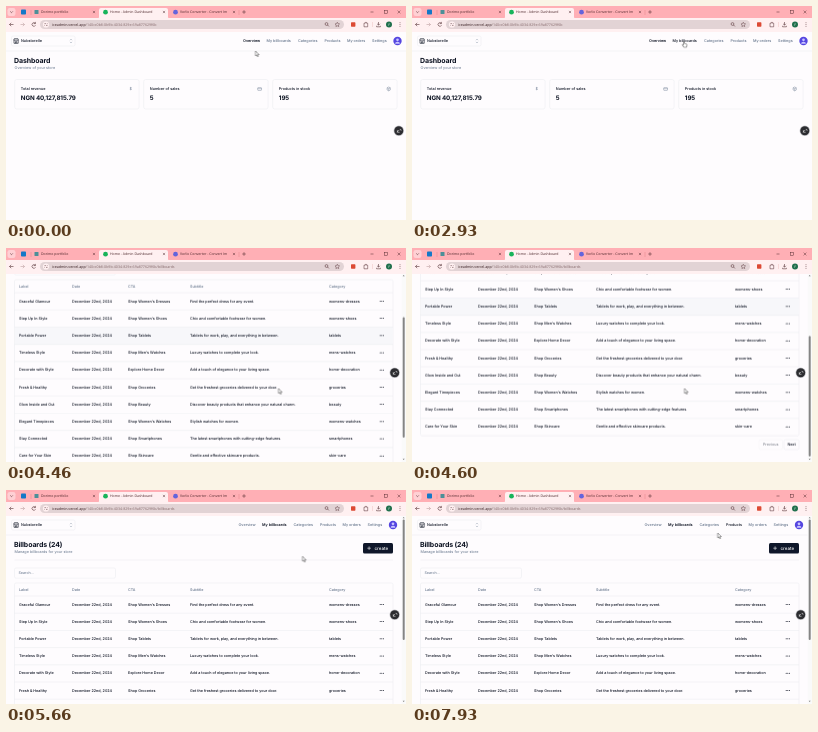
Write an HTML page that moves like this. It is 400x214 px and loops after 8 s.

```html
<!DOCTYPE html>
<html lang="en">
<head>
<meta charset="utf-8">
<title>Admin Dashboard</title>
<style>
  html, body { margin: 0; width: 100%; height: 100%; overflow: hidden; background: #fefcfe; }
  svg { display: block; width: 100vw; height: 100vh; }
  text { font-family: Inter, Roboto, sans-serif; text-rendering: geometricPrecision; white-space: pre; }
  .chrome text { font-family: "Open Sans", "Noto Sans", sans-serif; }
</style>
</head>
<body>
<svg id="stage" viewBox="0 0 400 214" preserveAspectRatio="none">
  <defs><clipPath id="view"><rect y="25" width="400" height="189"/></clipPath></defs>
</svg>
<script>
const LOOP = 8000, INK = '#0b1120', GREY = '#64748b', LINE = '#e9eaee', PAPER = '#fefcfe';
const PAGE_LOAD = 3260, SCROLL = 90.4, ROW = 17.2, TABLE_TOP = 106;
const stage = document.getElementById('stage');

function add(parent, tag, attrs = {}, content) {
  const el = document.createElementNS('http://www.w3.org/2000/svg', tag);
  for (const key in attrs) el.setAttribute(key, attrs[key]);
  if (content !== undefined) el.textContent = content;
  parent.append(el);
  return el;
}
const group = (parent, attrs) => add(parent, 'g', attrs);
const rect = (parent, x, y, width, height, fill, more) =>
  add(parent, 'rect', { x, y, width, height, fill, ...more });
const disc = (parent, cx, cy, r, fill, more) => add(parent, 'circle', { cx, cy, r, fill, ...more });
const path = (parent, d, stroke = INK, width = .55, fill = 'none') =>
  add(parent, 'path', { d, stroke, 'stroke-width': width, fill });
// y is the middle of the lower-case line
const label = (parent, x, y, content, size = 3.7, fill = INK, weight = 500, more = {}) =>
  add(parent, 'text', { x, y: y + size * .35, 'font-size': size, fill, 'font-weight': weight, ...more }, content);
const box = (parent, x, y, w, h, rx = 1.5) =>
  rect(parent, x, y, w, h, PAPER, { rx, stroke: LINE, 'stroke-width': .5 });

// steps: [time, value, easing towards the next step]
function play(el, prop, steps, easing = 'linear') {
  const frames = steps.map(([time, value, ease = easing]) =>
    ({ offset: time / LOOP, [prop]: value, easing: ease }));
  if (frames[0].offset > 0) frames.unshift({ ...frames[0], offset: 0 });
  const last = frames[frames.length - 1];
  if (last.offset < 1) frames.push({ ...last, offset: 1 });
  el.animate(frames, { duration: LOOP, iterations: Infinity });
}
// spans: [from, to] in ms during which the element shows
function showDuring(el, ...spans) {
  const steps = spans[0][0] > 0 ? [[0, 0]] : [];
  for (const [from, to] of spans) {
    steps.push([from, 1]);
    if (to < LOOP) steps.push([to, 0]);
  }
  play(el, 'opacity', steps, 'step-end');
}

function drawUrl(g, page, span) {
  const url = label(g, 46, 18.5, 'iceadmin.vercel.app', 3.62, '#33191c', 400);
  add(url, 'tspan', { fill: '#85696b' }, '/140cc0b8-0b9b-4034-829e-69a877629f6b' + page);
  showDuring(url, span);
}

function drawBrowser() {
  const g = group(stage, { class: 'chrome' });
  const dark = '#4a2529', bar = '#fff0f1';
  const close = (x, y, r = 1.1) =>
    path(g, `M${x - r} ${y - r}l${2 * r} ${2 * r}m0 ${-2 * r}l${-2 * r} ${2 * r}`, dark, .45);
  rect(g, 0, 0, 400, 13, '#ffafb5');
  rect(g, 1.5, 2, 8, 8, '#ffd0d4', { rx: 2.2 });
  path(g, 'M4.2 5.4l1.3 1.3 1.3-1.3', dark);
  rect(g, 15, 3.5, 5, 5, '#1478c8', { rx: .8 });
  path(g, 'M25 4v5M233 4v5', '#d97d82', .4);
  rect(g, 28.5, 4, 4, 4, '#4c8f98', { rx: .5 });
  label(g, 35, 6, 'Dorimo portfolio', 3.5, dark, 400);
  close(88, 6);
  path(g, 'M91 13q2 0 2-2V4q0-2 2-2h65q2 0 2 2v7q0 2 2 2z', 'none', 0, bar);
  disc(g, 99.5, 6.2, 2.4, '#18b45b');
  label(g, 104, 6, 'Home - Admin Dashboard', 3.5, dark, 400);
  close(158, 6);
  disc(g, 169.5, 6.2, 2.4, '#6464dc');
  label(g, 174, 6, 'Vorlix Converter - Convert Im', 3.5, dark, 400);
  close(228, 6);
  path(g, 'M236.2 6h3.6m-1.8-1.8v3.6M364.5 6h3', dark, .5);
  rect(g, 378.6, 4.6, 2.8, 2.8, 'none', { stroke: dark, 'stroke-width': .45 });
  close(393, 6, 1.4);

  rect(g, 0, 12, 400, 14, bar);
  path(g, 'M7.5 18.5h-4m1.7-1.7l-1.7 1.7 1.7 1.7', dark);
  path(g, 'M14.5 18.5h4m-1.7-1.7l1.7 1.7-1.7 1.7', '#b99a9c');
  path(g, 'M29.3 17.4a1.8 1.8 0 1 0 .2 1.8m-.1-3.3v1.7h-1.7', dark);
  rect(g, 34, 13.9, 304, 9.2, '#e2d3d5', { rx: 4.6 });
  disc(g, 40, 18.5, 3.1, bar);
  path(g, 'M38.5 17.6h1.4m1 0h.6m-3 1.8h.5m1 0h1.5', dark, .5);
  drawUrl(g, '', [0, PAGE_LOAD]);
  drawUrl(g, '/billboards', [PAGE_LOAD, LOOP]);
  disc(g, 320.5, 18, 1.4, 'none', { stroke: dark, 'stroke-width': .5 });
  path(g, 'M321.5 19l1.4 1.4', dark);
  path(g, 'M331.3 16.2l.7 1.5 1.6.2-1.2 1.1.3 1.6-1.4-.8-1.4.8.3-1.6-1.2-1.1 1.6-.2z', dark, .4);
  rect(g, 345, 16.3, 4.4, 4.4, '#dc4a34', { rx: .6 });
  path(g, 'M358 17.2h1.3v-.8h1.2v.8h1.2v3.6H358z', dark, .5);
  path(g, 'M366.5 16v5', '#e9b5b7', .4);
  path(g, 'M372.5 16v3m-1.4-1.2l1.4 1.4 1.4-1.4m-3.3 2v1h3.8v-1', dark);
  disc(g, 383, 18.5, 3, '#20704d');
  label(g, 383, 18.4, 'F', 3.3, '#fff', 400, { 'text-anchor': 'middle' });
  for (const y of [16.8, 18.5, 20.2]) disc(g, 394, y, .45, dark);
}

const NAV = [['Overview', 237], ['My billboards', 260.5], ['Categories', 292],
  ['Products', 318.5], ['My orders', 341], ['Settings', 366]];

// shift makes room for the scrollbar; hover is [link, start, end]
function drawHeader(g, active, shift, hover) {
  box(g, 5.5, 30, 63.5, 10);
  path(g, 'M8 34.3v3h4.2v-3M7.7 34.2l.6-1.5h3.6l.6 1.5zM9.5 37.3v-1.7h1.2v1.7', INK, .6);
  label(g, 15, 35, 'Nubstorelle', 3.8);
  path(g, 'M64 34.2l1-1 1 1m-2 1.7l1 1 1-1', GREY, .4);
  NAV.forEach(([name, x], i) => {
    const link = label(g, x - shift, 35, name, 3.75, i === active ? INK : GREY, i === active ? 600 : 500);
    if (i === hover[0])
      play(link, 'fill', [[0, GREY], [hover[1], GREY], [hover[1] + 150, INK], [hover[2], INK]]);
  });
  const x = 391.5 - shift;
  disc(g, x, 35, 4.2, '#5546e0');
  disc(g, x, 33.8, 1.35, '#c9c5ff');
  path(g, `M${x - 2.4} 37.8q0-2 2.4-2t2.4 2z`, 'none', 0, '#c9c5ff');
  path(g, `M0 45h${400 - shift}`, LINE, .5);
}

function drawTitle(g, title, subtitle) {
  label(g, 8, 54.7, title, 7, INK, 700, { 'letter-spacing': -.12 });
  label(g, 8.5, 62, subtitle, 3.78, GREY, 400);
}

function drawFloater(g, x) {
  disc(g, x, 124.8, 5.2, '#c6c6ca');
  disc(g, x, 124.8, 4.5, '#2c2c30');
  path(g, `M${x - 1.8} 126.2l2.4-2.4m-2 .3v2.2h2.2m.3-3.1q1.6 0 1.2 1.6`, '#fff', .5);
}

function drawOverview(g) {
  rect(g, 0, 25, 400, 189, PAPER);
  drawHeader(g, 0, 0, [1, 2650, PAGE_LOAD]);
  drawTitle(g, 'Dashboard', 'Overview of your store');
  const cards = [['Total revenue', 'NGN 40,127,815.79'], ['Number of sales', '5'], ['Products in stock', '195']];
  cards.forEach(([name, value], i) => {
    const x = 8.7 + i * 129;
    box(g, x, 73.5, 124.4, 29.5, 2);
    label(g, x + 6.1, 82.8, name, 3.8, INK, 500);
    label(g, x + 6.1, 91.8, value, 6.2, INK, 700, { 'letter-spacing': -.08 });
  });
  label(g, 124.7, 83, '$', 3.8, GREY, 400, { 'text-anchor': 'middle' });
  rect(g, 251.7, 81.6, 3.8, 2.8, 'none', { rx: .5, stroke: GREY, 'stroke-width': .4 });
  path(g, 'M251.7 82.7h3.8', GREY, .4);
  path(g, 'M382.7 81l1.6.8v2.2l-1.6.9-1.6-.9v-2.2zm-1.6.8l1.6.9 1.6-.9m-1.6.9v2.2', GREY, .4);
  drawFloater(g, 392.8);
}

const COLUMNS = [[13, 'Label'], [66, 'Date'], [122, 'CTA'], [184, 'Subtitle'], [323, 'Category']];
const ROWS = [
  ['Graceful Glamour', "Shop Women's Dresses", 'Find the perfect dress for any event.', 'womens-dresses'],
  ['Step Up In Style', "Shop Women's Shoes", 'Chic and comfortable footwear for women.', 'womens-shoes'],
  ['Portable Power', 'Shop Tablets', 'Tablets for work, play, and everything in between.', 'tablets'],
  ['Timeless Style', "Shop Men's Watches", 'Luxury watches to complete your look.', 'mens-watches'],
  ['Decorate with Style', 'Explore Home Decor', 'Add a touch of elegance to your living space.', 'home-decoration'],
  ['Fresh & Healthy', 'Shop Groceries', 'Get the freshest groceries delivered to your door.', 'groceries'],
  ['Glow Inside and Out', 'Shop Beauty', 'Discover beauty products that enhance your natural charm.', 'beauty'],
  ['Elegant Timepieces', "Shop Women's Watches", 'Stylish watches for women.', 'womens-watches'],
  ['Stay Connected', 'Shop Smartphones', 'The latest smartphones with cutting-edge features.', 'smartphones'],
  ['Care for Your Skin', 'Shop Skincare', 'Gentle and effective skincare products.', 'skin-care']
];
const ROW_HOVERS = {
  0: [[3990, 4050]],
  1: [[4050, 4130], [5330, 5380]],
  2: [[4130, 4720], [5170, 5330]],
  7: [[4720, 5170]]
};
const scrollSteps = distance => [
  [0, 'translateY(0px)'], [4345, 'translateY(0px)', 'ease-out'],
  [4580, `translateY(${distance}px)`], [4880, `translateY(${distance}px)`, 'ease-in-out'],
  [5150, 'translateY(0px)']
];

function drawTable(g) {
  box(g, 8.5, 93, 378.5, TABLE_TOP - 93 + ROWS.length * ROW);
  for (const [x, name] of COLUMNS) label(g, x, 99.5, name, 3.7, GREY, 500);
  ROWS.forEach(([name, cta, subtitle, category], i) => {
    const top = TABLE_TOP + i * ROW, mid = top + ROW / 2 - .4;
    if (ROW_HOVERS[i])
      showDuring(rect(g, 8.8, top, 378, ROW, '#f7f7fa'), ...ROW_HOVERS[i]);
    path(g, `M8.5 ${top}H387`, LINE, .5);
    [name, 'December 22nd, 2024', cta, subtitle, category].forEach((cell, c) =>
      label(g, COLUMNS[c][0], mid, cell, 3.72, INK, 500));
    for (const dx of [-1.6, 0, 1.6]) disc(g, 375.8 + dx, mid + .2, .5, INK);
  });
  box(g, 347, 282, 23.5, 10).setAttribute('opacity', .5);
  label(g, 358.7, 286.8, 'Previous', 3.75, '#858993', 500, { 'text-anchor': 'middle' });
  box(g, 372, 282, 15, 10);
  label(g, 379.6, 286.8, 'Next', 3.75, INK, 500, { 'text-anchor': 'middle' });
}

function drawBillboards(g) {
  rect(g, 0, 25, 400, 189, PAPER);
  const page = group(g);
  drawHeader(page, 1, 4.5, [3, 6430, LOOP]);
  drawTitle(page, 'Billboards (24)', 'Manage billboards for your store');
  rect(page, 357, 53, 30, 10.5, '#0f172a', { rx: 1.5 });
  path(page, 'M361.3 58.2h3.6m-1.8-1.8v3.6', '#fff', .55);
  label(page, 368.5, 58, 'create', 4.5, '#fff', 500);
  path(page, 'M8.5 70H387', LINE, .5);
  box(page, 8.5, 78, 101, 10.2);
  label(page, 12.5, 83, 'Search...', 3.7, GREY, 400);
  drawTable(page);
  play(page, 'transform', scrollSteps(-SCROLL));

  rect(g, 395.8, 25, 4.2, 189, '#fafafa');
  path(g, 'M396.7 28.3l1-1.4 1 1.4zM396.7 210.7l1 1.4 1-1.4z', 'none', 0, '#777');
  const thumb = rect(g, 396.7, 29.5, 2, 120.5, '#858585', { rx: 1 });
  play(thumb, 'transform', scrollSteps(58.5));
  drawFloater(g, 388.7);
}

function drawCursor() {
  const g = group(stage);
  const arrow = path(g, 'M0 0v4.9l1.1-1 .8 1.8.9-.4-.8-1.7h1.6z', '#111', .4, '#fff');
  const hand = path(g, 'M-.5 .3q.5-.6 1 0v2l2 .5q.6.2.5.9l-.4 2.3h-2.8l-1.6-2.2q0-.7.7-.5l.6.5z', '#111', .4, '#fff');
  showDuring(arrow, [0, 2650], [3720, 6430], [7870, LOOP]);
  showDuring(hand, [2650, 3720], [6430, 7870]);
  const stops = [[0, 249.5, 45], [2350, 249.5, 45], [2750, 272, 35.2], [3650, 272, 35.2],
    [4220, 272.5, 140.5], [5230, 272.5, 140.5], [5600, 296.5, 66.3], [5800, 296.5, 66.3],
    [6060, 297.5, 63], [6130, 298, 62.5], [6520, 318, 35.2], [7820, 318, 35.2], [7930, 305.7, 43]];
  play(g, 'transform', stops.map(([time, x, y]) => [time, `translate(${x}px, ${y}px)`]), 'ease-in-out');
}

const overview = group(stage, { 'clip-path': 'url(#view)' });
const billboards = group(stage, { 'clip-path': 'url(#view)' });
drawOverview(overview);
drawBillboards(billboards);
showDuring(overview, [0, PAGE_LOAD]);
showDuring(billboards, [PAGE_LOAD, LOOP]);
drawBrowser();
drawCursor();
</script>
</body>
</html>
```
